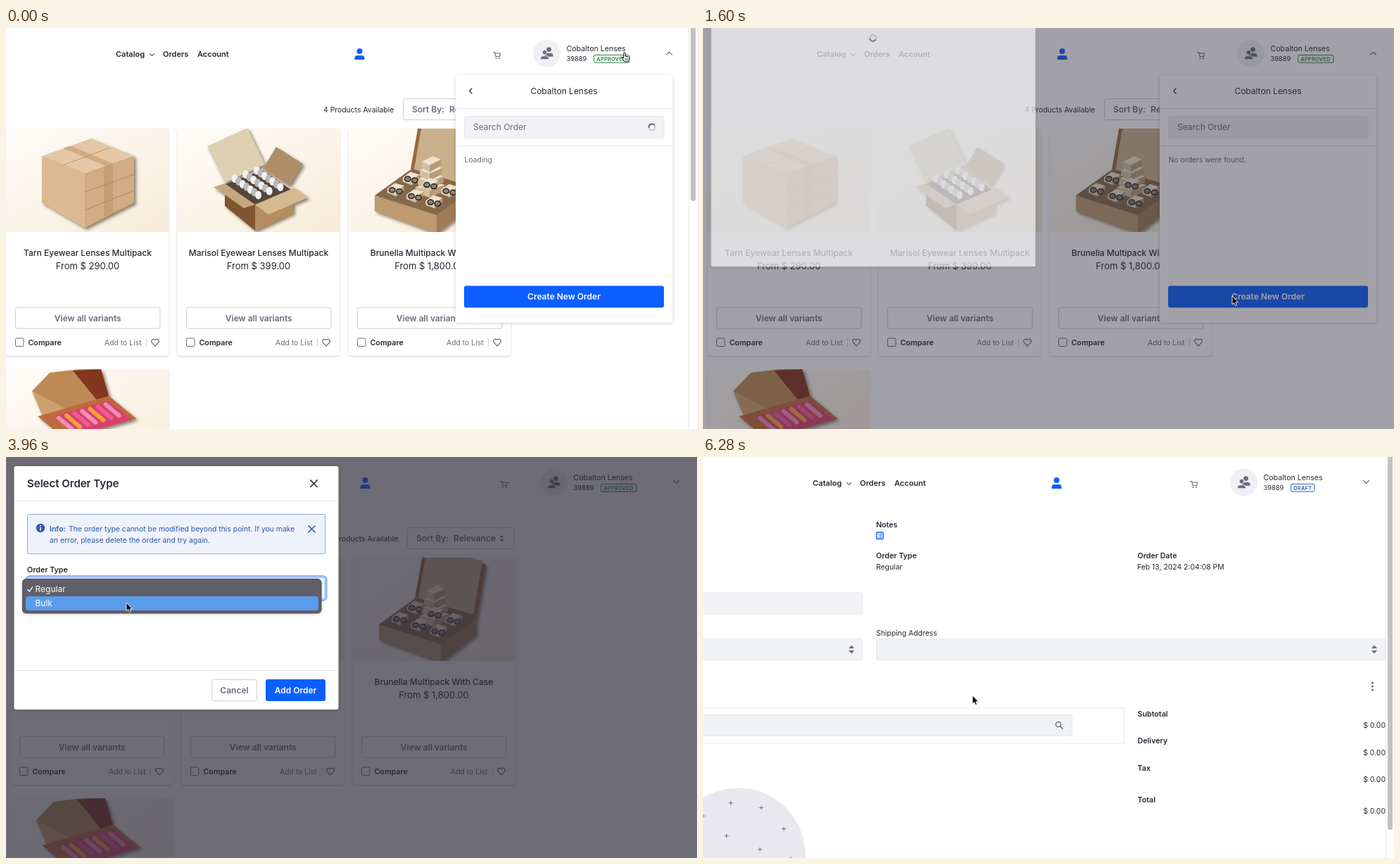
An HTML page that plays this animation: 982 by 570 pixels, repeating every 6.32 s.

```html
<!DOCTYPE html>
<html lang="en">
<head>
<meta charset="utf-8">
<title>Create a new order</title>
<style>
html, body { margin: 0; width: 100%; height: 100%; overflow: hidden; background: #fff; }
svg { display: block; }
text { font-family: Inter, "Noto Sans", sans-serif; white-space: pre; }
.card { filter: drop-shadow(0 1px 1.2px #0003); }
.float { filter: drop-shadow(0 1px 2px #0003); }
.photo { filter: drop-shadow(3px 3px 2px #4a382899); }
</style>
</head>
<body>
<svg id="stage" width="982" height="570" viewBox="0 0 982 570"></svg>
<script>
const INK = '#272833', GREY = '#6b6c7e', BLUE = '#0b5fff', FIELD = '#f1f2f5', LINE = '#e7e7ed', INFO = '#2e5aac';
const LOOP = 6320, ACCOUNT = 'Cobalton Lenses';
const range = n => [...Array(n).keys()];
const repeat = (n, draw) => range(n).map(draw).join('');

// Drawing helpers, all returning SVG markup
const text = (x, y, s, size, weight = 400, fill = INK, anchor = 'start', extra = '') =>
  `<text x="${x}" y="${y}" font-size="${size}" font-weight="${weight}" fill="${fill}" text-anchor="${anchor}" ${extra}>${s}</text>`;
const bold = (x, y, s, size = 10.7, fill = INK) => text(x, y, s, size, 600, fill);
const small = (x, y, s, fill = INK, anchor) => text(x, y, s, 10.4, 400, fill, anchor);
const rect = (x, y, w, h, fill, stroke = 'none', r = 3, extra = '') =>
  `<rect x="${x}" y="${y}" width="${w}" height="${h}" rx="${r}" fill="${fill}" stroke="${stroke}" ${extra}/>`;
const line = (d, stroke = INK, width = 1.2) =>
  `<path d="${d}" fill="none" stroke="${stroke}" stroke-width="${width}" stroke-linecap="round" stroke-linejoin="round"/>`;
const shape = (d, fill) => `<path d="${d}" fill="${fill}"/>`;
const oval = (x, y, rx, ry, fill) => `<ellipse cx="${x}" cy="${y}" rx="${rx}" ry="${ry}" fill="${fill}"/>`;
const dot = (x, y, r, fill) => oval(x, y, r, r, fill);
const group = (id, body) => `<g id="${id}">${body}</g>`;
const cross = (x, y, r, color) => line(`M${x - r} ${y - r}l${2 * r} ${2 * r}m0 ${-2 * r}l${-2 * r} ${2 * r}`, color, 1.5);
const chevron = (x, y, k, dy, color = GREY) => line(`M${x - k} ${y - dy / 2}l${k} ${dy}l${k} ${-dy}`, color, 1.1);
const carets = (x, y, k = 1) => shape(`M${x - 4 * k} ${y - 1.5 * k}h${8 * k}l${-4 * k} ${-4.5 * k}zm0 ${3 * k}h${8 * k}l${-4 * k} ${4.5 * k}z`, GREY);
const field = (x, y, w, h = 30.5) => rect(x, y, w, h, FIELD, LINE);
const button = (x, y, w, label, primary) =>
  (primary ? rect(x - .5, y - .5, w + 1, 31, BLUE) : rect(x, y, w, 30, '#fff', '#cdced9')) +
  text(x + w / 2, y + 19.3, label, 12, 600, primary ? '#fff' : GREY, 'middle');
const spinner = (id, x, y) => `<g transform="translate(${x} ${y})">` + group(id,
  `<circle r="4.5" fill="none" stroke="#c9cad3" stroke-width="2"/>` + line('M-4.5 0A4.5 4.5 0 0 1 3.2 -3.2', GREY, 2)) + '</g>';
const person = (x, y, k, fill) =>
  dot(x, y - 4 * k, 4 * k, fill) + shape(`M${x - 7 * k} ${y + 8 * k}v${-2 * k}q0 ${-4 * k} ${4 * k} ${-4 * k}h${6 * k}q${4 * k} 0 ${4 * k} ${4 * k}v${2 * k}z`, fill);

// Cardboard: flat faces spanned by two edges, and boxes seen from their front top corner
const face = (x, y, [ux, uy], [vx, vy], fill) => shape(`M${x} ${y}l${ux} ${uy}l${vx} ${vy}l${-ux} ${-uy}z`, fill);
const crate = (x, y, u, v, h, top, left, right) => {
  const side = ([dx, dy], fill) => shape(`M${x} ${y}l${dx} ${dy}v${h * .86}L${x} ${y + h}z`, fill);
  return face(x, y, u, v, top) + side(u, left) + side(v, right);
};
const inside = (x, y, u, v, a, b) => [x + u[0] * a + v[0] * b, y + u[1] * a + v[1] * b];

function closedBox() {
  const u = [-61, -25], v = [70, -25];
  return crate(112, 207, u, v, 77, '#e4c8a5', '#dcb990', '#d2ac82') +
    face(142, 196, u, [10, -3.5], '#cfac84') + face(139, 197.5, [13, -4.5], [0, 71], '#c59d72') +
    repeat(2, k => line(`M112 ${233 + 26 * k}l70 ${-25 - 3 * k}`, '#a9855c', .8)) + line('M81 195l67 -25', '#b08c62', .8);
}

function openBox() {
  const u = [-43, -30], v = [54, -20];
  return face(311, 220, [57, -26], [-25, -52], '#ddcfb2') + face(365, 200, [38, 24], [19, -31], '#ad9069') +
    crate(354, 252, u, v, 36, '#54463a', '#80552f', '#b58d60') +
    repeat(3, i => repeat(7, j => {
      const [x, y] = inside(354, 252, u, v, .95 - .13 * j, .8 - .29 * i);
      return oval(x, y - 5, 4.5, 6, j % 2 ? '#b9b8bd' : '#f1f0f2');
    })) +
    face(354, 251, u, [-16, 5], '#c4a77e') + face(354, 251, [56, -24], [19, 14], '#d5b98f');
}

function caseBox() {
  const u = [-88, -28], v = [50, -36];
  return face(574, 207, [88, 26], [14, -80], '#94683f') + face(580, 201, [78, 23], [13, -76], '#c9b08b') +
    crate(612, 266, u, v, 26, '#86694a', '#bd9a70', '#a07c55') +
    repeat(4, k => crate(602, 231 - 12 * k, [3 * k - 20, -5], [22 - 2 * k, -8], 10, '#eee2cd', '#d3bf9f', '#b89c76')) +
    repeat(6, n => {
      const [x, y] = inside(612, 266, u, v, .82 - .31 * (n >> 1), n % 2 ? .3 : .74);
      return crate(x, y, [-13, -4], [11, -8], 7, '#eee2cd', '#dccab0', '#b89c76') +
        repeat(2, k => `<g stroke="#2a2624" stroke-width="1.5">${oval(x - 6 + 10 * k, y - 2 + 2 * k, 4.2, 3.5, '#8d8378')}</g>`);
    });
}

function candyBox() {
  const u = [101, -29], v = [39, 32];
  return shape('M52 550L37 516L62 490L104 485L135 485L146 523L98 548z', '#bd8a55') + shape('M95 487L135 485L146 523L130 530z', '#84341f') +
    shape('M37 516L98 548L52 552z', '#cfa06b') + face(45, 552, u, v, '#bf6a3c') + face(70, 551, [76, -21], [33, 27], '#d8416f') +
    repeat(7, i => {
      const [x, y] = inside(45, 552, u, v, .2 + .11 * i, .25);
      return line(`M${x} ${y}l19 16`, ['#f08fb5', '#f3a23c', '#ee5c92'][i % 3], 6);
    });
}

const photo = (x, y, body) =>
  `<svg x="${x}" y="${y}" width="231" height="147" viewBox="${x} ${y} 231 147">` +
  rect(x, y, 231, 147, 'url(#cream)', 'none', 0) + `<g class="photo">${body}</g></svg>`;
const heart = (x, y) => line(`M${x} ${y + 5}l-4.6 -4.8a2.9 2.9 0 0 1 4.6 -3.8a2.9 2.9 0 0 1 4.6 3.8z`, GREY);
const product = (x, y, picture) => `<g class="card">${rect(x, y, 231, 323, '#fff')}</g>` + photo(x, y, picture());
const offer = (x, name, price) =>
  text(x + 115.5, 323.7, name, 12, 500, INK, 'middle') + text(x + 115.5, 343.4, 'From $ ' + price, 13, 400, INK, 'middle') +
  button(x + 13, 397.2, 205.5, 'View all variants') + rect(x + 13, 441, 11.5, 11.5, '#fff', GREY, 1.5) +
  bold(x + 31, 450.7, 'Compare') + small(x + 139.5, 450.7, 'Add to List', GREY) +
  line(`M${x + 199} 441.5v11`, '#cdced9', 1) + heart(x + 211.5, 447);

const products = [
  [closedBox, 'Tarn Eyewear Lenses Multipack', '290.00'],
  [openBox, 'Marisol Eyewear Lenses Multipack', '399.00'],
  [caseBox, 'Brunella Multipack With Case', '1,800.00']];
const shopBody =
  small(451, 120, '4 Products Available') + rect(564.5, 100.5, 151.5, 30, '#fff', '#cdced9') +
  bold(577, 119.8, 'Sort By:', 12, GREY) + bold(630, 119.8, 'Relevance', 12, GREY) + carets(698.5, 115.7, .75) +
  products.map(([picture, name, price], i) => product(.5 + 243 * i, 143, picture) + offer(.5 + 243 * i, name, price)).join('') +
  product(.5, 485, candyBox);

// Two rings of plus signs on the disc
const ring = (n, r, from, step) => line(repeat(n, i => {
  const a = (from + step * i) * Math.PI / 180;
  return `M${50 + r * Math.cos(a) - 2.5} ${566 + r * Math.sin(a)}h5m-2.5 -2.5v5`;
}), GREY, 1);

const orderBody =
  bold(246, 99.5, 'Notes') + rect(246.5, 107, 9.5, 9.5, '#fff', BLUE, 1, 'stroke-width="1.4"') +
  repeat(3, i => line(`M248.7 ${109.5 + 2.3 * i}h.2m2 0h3`, BLUE, 1)) +
  bold(246, 144, 'Order Type') + small(246, 160, 'Regular') +
  bold(617.5, 144, 'Order Date') + small(617, 160, 'Feb 13, 2024 2:04:08 PM') +
  field(-5, 193, 232, 30) + field(-5, 258.5, 232, 30) + carets(211, 273.5) +
  small(246, 254.3, 'Shipping Address') + field(246.5, 258.5, 724, 30) + carets(954, 273.5) +
  repeat(3, i => dot(951.5, 321 + 5 * i, 1.6, GREY)) +
  rect(-5, 357, 603.5, 50, '#fff', LINE, 0) + field(-5, 366.5, 529.5, 30) +
  `<circle cx="505" cy="380" r="3.6" fill="none" stroke="${GREY}" stroke-width="1.5"/>` + line('M508 383l3 3', GREY, 1.7) +
  ['Subtotal', 'Delivery', 'Tax', 'Total'].map((s, i) => {
    const y = 369 + 38.4 * i + (s === 'Total' ? 6.5 : 0);
    return bold(617.5, y, s) + small(970, y + 16.2, '$ 0.00', INK, 'end');
  }).join('') +
  dot(50, 566, 95.5, '#e9e8ee') + ring(5, 75, -132, 34) + ring(2, 32, -121, 106);

const badge = (id, label, w, color) => group(id,
  rect(835.7, 38.4, w, 10.8, '#fff', color, 1.5) + text(839.3, 46.5, label, 7.3, 600, color, 'start', 'letter-spacing=".3"'));
const accountBody =
  line('M692.5 34.5h2l1.6 6h5.3l1.2 -4.5h-7.2', GREY, 1.1) + dot(696.5, 43, 1.1, GREY) + dot(701, 43, 1.1, GREY) +
  dot(768.5, 36, 19.5, '#f0f0f4') + person(771.5, 34, .85, GREY) + `<g stroke="#f0f0f4">${person(765.5, 38, .85, GREY)}</g>` +
  text(796.5, 33.2, ACCOUNT, 10.6) + text(796.5, 47, '39889', 9.3) +
  badge('approved', 'APPROVED', 50, '#287d3c') + badge('draft', 'DRAFT', 33, INFO) +
  group('chevronUp', chevron(942.5, 36, 4, -4)) + group('chevronDown', chevron(942.5, 35.5, 4, 4));

const panelBody =
  `<g class="float">${rect(639, 67, 308.5, 352, '#fff')}</g>` + line('M662 86l-3.3 3.5l3.3 3.5') +
  text(793, 94, ACCOUNT, 12, 400, INK, 'middle') + line('M639 114.5h308M639 167.5h308', LINE, 1) +
  field(651.5, 125.5, 283.5) + text(664, 145.3, 'Search Order', 12, 400, GREY) +
  group('loading', small(651.5, 191, 'Loading', GREY) + spinner('searchSpin', 918, 141)) +
  group('noOrders', small(651.5, 191, 'No orders were found.', GREY)) +
  button(651.5, 367, 283, 'Create New Order', true);

const formBody =
  bold(30, 43.2, 'Select Order Type', 15) + cross(437.5, 37.7, 4.8, INK) +
  line('M12 62.5h460M12 303.5h460', LINE, 1) +
  rect(30.5, 81.5, 423, 56, '#eef2fa', '#89a7e0', 2) + dot(49, 101, 6.2, INFO) +
  line('M49 100.5v3.5', '#fff', 1.7) + dot(49, 97.8, 1, '#fff') +
  bold(62, 105.6, 'Info:', 10.5, INFO) + small(89, 105.6, 'The order type cannot be modified beyond this point. If you make', INFO) +
  small(62, 121.7, 'an error, please delete the order and try again.', INFO) + cross(434.5, 102.3, 4.6, INFO) +
  bold(30, 164, 'Order Type') + field(30.5, 171.3, 423) +
  group('focus', rect(28.5, 169.2, 427, 34.5, '#fff', '#7aa7fb', 5, 'stroke-width="2"') + rect(30.5, 171.3, 423, 30.5, '#f0f5ff', '#80acff')) +
  text(43, 190.8, 'Regular', 12) + carets(438, 186.6) +
  button(292.5, 316.5, 64, 'Cancel') + button(369.5, 316.5, 84, 'Add Order', true);

const popupBody =
  `<g class="float">${rect(23.5, 173.5, 424.5, 48.5, '#605f68', '#4b4a52', 5)}</g>` +
  group('hover', rect(28, 198, 416, 20, '#5a9cec', 'none', 4)) +
  line('M31 188.5l2.3 2.8l4.2 -6.5', '#fff', 1.3) +
  text(41.5, 191.8, 'Regular', 12, 400, '#fff') + text(41.5, 211.8, 'Bulk', 12, 400, '#fff');

stage.innerHTML =
  '<defs><linearGradient id="cream" x2="1" y2="1"><stop stop-color="#fefcf8"/><stop offset="1" stop-color="#f8ecda"/></linearGradient></defs>' +
  group('shop', shopBody) + group('order', orderBody) +
  group('nav', bold(156, 41, 'Catalog', 11) + chevron(207.5, 38, 3, 3) + bold(223, 41, 'Orders', 11) + bold(272, 41, 'Account', 11)) +
  group('user', person(502.5, 37, 1, BLUE)) + group('account', accountBody) + group('panel', panelBody) +
  group('scrollbar', rect(970, 0, 12, 570, '#fff', 'none', 0) + line('M970.5 0v570', '#e8e8e8', 1) +
    rect(973, -10, 7, 256, '#c1c1c1', 'none', 3.5, 'id="thumb"')) +
  rect(0, 0, 982, 570, '#2c2b3a', 'none', 0, 'id="backdrop"') +
  group('modal', rect(11.5, 13, 461, 346, '#fff', 'none', 3, 'class="float"') + spinner('modalSpin', 241.5, 34) + group('form', formBody)) +
  group('popup', popupBody) +
  group('cursor',
    group('arrow', '<path d="M0 0V12L2.7 9.6L4.6 13.6L6.5 12.8L4.8 8.9H8.4Z" fill="#000" stroke="#fff" stroke-width=".9"/>') +
    group('hand', '<path d="M-1.2 1.2a1.2 1.2 0 0 1 2.4 0V5l4.4 1q1.6.5 1.3 2l-.7 3.4q-.3 1.5-1.6 1.5H1q-1 0-1.6-1L-4 7.6q-.5-1.5 1-1.3L-1.2 8z" fill="#fff" stroke="#000"/><path d="M1.8 8v3m2-3v3" stroke="#000" stroke-width=".7"/>'));

const $ = id => document.getElementById(id);
const show = states => Object.entries(states).forEach(([id, on]) => $(id).setAttribute('visibility', on ? 'inherit' : 'hidden'));
const move = (id, x, y = 0) => $(id).setAttribute('transform', `translate(${x} ${y})`);
const fade = (id, a) => $(id).setAttribute('opacity', a);
const ramp = (t, from, to) => Math.min(1, Math.max(0, (t - from) / (to - from)));
const ease = p => p * p * (3 - 2 * p);
const between = (t, a, b) => t >= a && t < b;

// Pointer trips: start, end, and where each one arrives
const trips = [[300, 1280, 752, 381], [1900, 2440, 199, 253], [2640, 3000, 175, 186],
  [3220, 3360, 171, 207], [4540, 4880, 167, 227], [4970, 5360, 383, 339]];
const pointerAt = t => trips.reduce(([x, y], [from, to, toX, toY]) => {
  const e = ease(ramp(t, from, to));
  return [x + (toX - x) * e, y + (toY - y) * e];
}, [879, 35]);

function draw(t) {
  const modalOpen = between(t, 1512, 6240), ordered = t >= 6240, panelOpen = t < 2900;
  const formReady = between(t, 1910, 5540);
  const hand = t < 500 || between(t, 1190, 1500) || between(t, 5200, 5540);
  show({
    shop: !ordered, order: ordered, approved: !ordered, draft: ordered,
    panel: panelOpen, chevronUp: panelOpen, chevronDown: !panelOpen,
    loading: t < 740, noOrders: between(t, 740, 2900), scrollbar: !modalOpen,
    form: formReady, modalSpin: !formReady, focus: between(t, 3080, 5520),
    popup: between(t, 3120, 5050), hover: between(t, 3280, 4800), hand, arrow: !hand
  });

  // Without the scrollbar the page is wider, so its parts sit further right
  const shifts = { shop: 6, nav: 6, user: 8, account: 10, panel: 10 };
  for (const id in shifts) move(id, modalOpen ? shifts[id] : 0);
  $('thumb').setAttribute('height', ordered ? 540 : 256);

  const shown = ramp(t, 1512, 1650) * (1 - ramp(t, 6140, 6240));
  fade('backdrop', .69 * shown);
  fade('modal', shown);
  fade('popup', 1 - ramp(t, 4890, 5030));
  move('modal', 0, -36 * (1 - ramp(t, 1512, 1812)) ** 1.7);
  for (const id of ['searchSpin', 'modalSpin']) $(id).setAttribute('transform', `rotate(${t * .36})`);
  move('cursor', ...pointerAt(t));
}

function tick() {
  draw(performance.now() % LOOP);
  requestAnimationFrame(tick);
}
tick();
</script>
</body>
</html>
```
